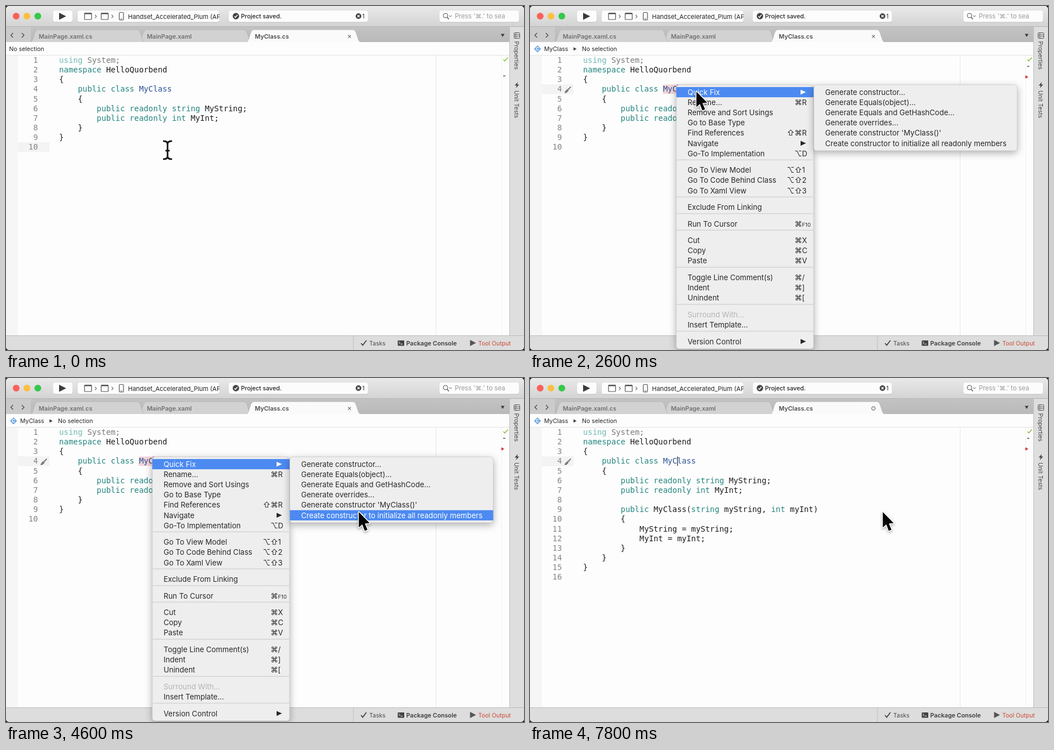
An HTML page with a canvas that plays this animation: 917 by 611 pixels, repeating every 8 s.

```html
<!DOCTYPE html>
<html lang="en">
<head>
<meta charset="utf-8">
<title>Generate constructor</title>
<style>
  html, body { margin: 0; width: 100%; height: 100%; overflow: hidden; background: #000; }
  canvas { display: block; width: 917px; height: 611px; }
</style>
</head>
<body>
<canvas id="stage" width="917" height="611"></canvas>
<script>
const W = 917, H = 611, LOOP = 8000, STEP = 200;
const screen2d = document.getElementById('stage').getContext('2d');
const layer = document.createElement('canvas');
layer.width = W;
layer.height = H;
const layer2d = layer.getContext('2d');
let ctx = screen2d; // the surface that the helpers draw on

const UI = 'Inter, "Open Sans", sans-serif';
const SYMBOL = 'Inter, "DejaVu Sans", sans-serif';
const MONO = '13.82px "DejaVu Sans Mono", monospace';

// Moments of the story, in ms
const CLICK = 1200, MENU = 1600, HOVER = 2200, SUBMENU = 2600;
const FADE = 5200, CLOSED = 5400, INSERT = 5600, BRUSH = 6800;

const PATH = [
  [200, 286, 256], [1000, 260, 148], [1800, 260, 148], [2200, 294.5, 152], [2600, 294.5, 152],
  [3000, 480, 154], [3300, 552, 182], [3600, 612, 228], [4000, 624.5, 238]
];

const HEAD = ['using System;', 'namespace HelloQuorbend', '{', '    public class MyClass', '    {',
  '        public readonly string MyString;', '        public readonly int MyInt;'];
const TAIL = ['    }', '}', ''];
const ADDED = ['', '        public MyClass(string myString, int myInt)', '        {',
  '            MyString = myString;', '            MyInt = myInt;', '        }'];

// Each group is set apart by a line; entries are label, modifiers, key
const GROUPS = [
  [['Quick Fix', '', '>'], ['Rename...', '⌘', 'R'], ['Remove and Sort Usings'], ['Go to Base Type'],
   ['Find References', '⇧⌘', 'R'], ['Navigate', '', '>'], ['Go-To Implementation', '⌥', 'D']],
  [['Go To View Model', '⌥⇧', '1'], ['Go To Code Behind Class', '⌥⇧', '2'], ['Go To Xaml View', '⌥⇧', '3']],
  [['Exclude From Linking']],
  [['Run To Cursor', '⌘', 'F10']],
  [['Cut', '⌘', 'X'], ['Copy', '⌘', 'C'], ['Paste', '⌘', 'V']],
  [['Toggle Line Comment(s)', '⌘', '/'], ['Indent', '⌘', ']'], ['Unindent', '⌘', '[']],
  [['Surround With...'], ['Insert Template...']],
  [['Version Control', '', '>']]
];
const FIXES = ['Generate constructor...', 'Generate Equals(object)...', 'Generate Equals and GetHashCode...',
  'Generate overrides...', "Generate constructor 'MyClass()'",
  'Create constructor to initialize all readonly members'];

const ROW = 18.17, MENU_TOP = 153, MENU_SIZE = 13.05;
const LINE = 17.15, COL = 8.32, CODE_X = 94;

function text(s, x, y, size, color = '#262626', weight = 400, align = 'left', family = UI) {
  ctx.font = `${weight} ${size}px ${family}`;
  ctx.fillStyle = color;
  ctx.textAlign = align;
  ctx.fillText(s, x, y);
}

function rect(x, y, w, h, color) {
  ctx.fillStyle = color;
  ctx.fillRect(x, y, w, h);
}

function box(x, y, w, h, r, fill, line, width = 1) {
  ctx.beginPath();
  ctx.roundRect(x, y, w, h, r);
  if (fill) { ctx.fillStyle = fill; ctx.fill(); }
  if (line) { ctx.strokeStyle = line; ctx.lineWidth = width; ctx.stroke(); }
}

function dot(x, y, r, fill, line) {
  box(x - r, y - r, 2 * r, 2 * r, r, fill, line);
}

function trace(points) {
  ctx.beginPath();
  points.forEach(([x, y], i) => i ? ctx.lineTo(x, y) : ctx.moveTo(x, y));
}

function poly(color, ...points) {
  trace(points);
  ctx.fillStyle = color;
  ctx.fill();
}

function stroke(color, width, ...points) {
  trace(points);
  ctx.strokeStyle = color;
  ctx.lineWidth = width;
  ctx.stroke();
}

function shade(y0, y1, top, bottom) {
  const g = ctx.createLinearGradient(0, y0, 0, y1);
  g.addColorStop(0, top);
  g.addColorStop(1, bottom);
  return g;
}

function button(x, w) {
  box(x, 8, w, 21.5, 4, '#c2c2c2');
  box(x, 7.5, w, 21, 4, '#fcfcfc', '#d6d6d6', 0.6);
}

function toolbar() {
  rect(0, 0, W, 37, shade(0, 37, '#e9e9e9', '#d3d3d3'));
  dot(18, 18, 6, '#fb615b');
  dot(37, 18, 6, '#fdbe41');
  dot(56.3, 18, 6, '#35c84b');
  button(83, 35);
  poly('#3b3b3b', [94, 12], [106.5, 18.2], [94, 24.5]);

  button(126.5, 251.5);
  for (const x of [139, 168.5]) {
    box(x, 12.5, 12.5, 11.5, 1, null, '#555', 1.2);
    rect(x, 12.5, 12.5, 2, '#555');
    stroke('#555', 1.1, [x + 18.5, 15.5], [x + 21, 18.5], [x + 18.5, 21.5]);
  }
  box(200.5, 11.5, 7.5, 13.5, 1.5, null, '#555', 1.2);
  rect(202.5, 22.5, 3.5, 1, '#555');
  ctx.save();
  ctx.beginPath();
  ctx.rect(127, 7, 251, 23);
  ctx.clip();
  text('Handset_Accelerated_Plum (API 26)', 216, 22.5, 11);
  ctx.restore();

  button(394, 247);
  dot(407, 18, 5.7, '#444');
  stroke('#fff', 1.4, [404.3, 18.2], [406.2, 20.3], [409.8, 15.8]);
  text('Project saved.', 416, 22.3, 10.6, '#222', 500);
  dot(624, 18, 5, '#444');
  stroke('#fff', 1.3, [622, 16], [626, 20]);
  stroke('#fff', 1.3, [626, 16], [622, 20]);
  text('1', 630.5, 22, 10.6, '#333');

  button(767, 141.5);
  dot(778, 17, 4, null, '#555');
  stroke('#555', 1.4, [781, 20], [784, 23.5]);
  stroke('#555', 1, [784.5, 16.8], [786.7, 19], [789, 16.8]);
  text("Press '⌘.' to sea", 794.5, 22.3, 11.3, '#9a9a9a', 400, 'left', SYMBOL);
}

function tab(x0, x1, color, label, labelX, ink) {
  ctx.beginPath();
  ctx.moveTo(x0, 64);
  ctx.bezierCurveTo(x0 + 6, 61, x0 + 5, 42, x0 + 13, 42);
  ctx.lineTo(x1 - 13, 42);
  ctx.bezierCurveTo(x1 - 5, 42, x1 - 6, 61, x1, 64);
  ctx.fillStyle = color;
  ctx.fill();
  ctx.strokeStyle = '#b0b0b0';
  ctx.lineWidth = 0.7;
  ctx.stroke();
  text(label, labelX, 57.5, 10.7, ink, 600);
}

function tabs(dirty) {
  rect(0, 36, 891, 28, shade(36, 64, '#c3c3c3', '#b9b9b9'));
  rect(0, 36, W, 1, '#b2b2b2');
  rect(0, 37, 44, 27, '#cbcbcb');
  stroke('#444', 1.2, [12.5, 48], [8.5, 52], [12.5, 56]);
  stroke('#444', 1.2, [28, 48], [32, 52], [28, 56]);
  tab(236, 434, '#d2d2d2', 'MainPage.xaml', 249.5, '#707070');
  tab(44, 245, '#d2d2d2', 'MainPage.xaml.cs', 58, '#707070');
  tab(426, 627, '#fafafa', 'MyClass.cs', 440.5, '#4a4a4a');
  if (dirty) dot(608, 54, 3.2, null, '#555');
  else {
    stroke('#777', 1.1, [605.5, 51.5], [610.5, 56.5]);
    stroke('#777', 1.1, [610.5, 51.5], [605.5, 56.5]);
  }
  poly('#3c3c3c', [876, 49.5], [882.5, 49.5], [879.2, 55]);
}

function breadcrumb(inClass) {
  rect(0, 64, 891, 24, '#fdfdfd');
  rect(0, 87, 891, 1, '#e3e3e3');
  if (inClass) {
    poly('#6fa8e3', [13.3, 70], [19.6, 76.3], [13.3, 82.6], [7, 76.3]);
    text('C', 13.3, 79.2, 8, '#fff', 700, 'center');
    text('MyClass', 25, 80.2, 10.5);
    poly('#444', [77, 73.3], [82.5, 76.3], [77, 79.3]);
  }
  text('No selection', inClass ? 92 : 5.5, 80.2, 10.5);
}

function sidePanel() {
  rect(891, 37, 26, 549, '#dedede');
  rect(891, 37, 1, 549, '#c0c0c0');
  box(899.5, 47.5, 10, 10, 1, null, '#555');
  for (const y of [50.5, 53.5]) rect(900, y, 9, 1, '#666');
  rect(902, 48, 1, 9, '#666');
  poly('#444', [906, 135], [900.5, 141.3], [904, 141.3], [902.5, 146], [908.5, 139.5], [905, 139.5]);
  for (const [label, y] of [['Properties', 62.5], ['Unit Tests', 150]]) {
    ctx.save();
    ctx.translate(899.5, y);
    ctx.rotate(Math.PI / 2);
    text(label, 0, 0, 10.4, '#484848');
    ctx.restore();
  }
}

function statusBar() {
  rect(0, 585, W, 26, '#dddddd');
  rect(0, 585, W, 1, '#bcbcbc');
  rect(614.5, 586, 1, 25, '#bdbdbd');
  stroke('#444', 1.8, [628.5, 599], [631.5, 602.5], [638, 594]);
  text('Tasks', 643, 602.5, 10.5, '#4a4a4a');
  box(693.5, 594, 11.5, 9.5, 1, '#444');
  stroke('#fff', 1, [695.5, 596.2], [697.7, 598.2], [695.5, 600.2]);
  rect(698.5, 600, 3.5, 1, '#fff');
  text('Package Console', 708.5, 602.5, 10.7, '#3c3c3c', 600);
  poly('#555', [821.5, 593], [832, 598.5], [821.5, 604]);
  text('Tool Output', 836, 602.5, 10.5, '#cc4a33');
}

function codeLine(line, i) {
  const y = 101 + i * LINE;
  const color = word => {
    if (i === 0) return word === 'using' ? '#73b9b5' : '#7b7b7b';
    if (/^(namespace|public|class|readonly|string|int)$/.test(word)) return '#24857f';
    return i === 3 && word === 'MyClass' ? '#2b5296' : '#1c1c1c';
  };
  ctx.textAlign = 'left';
  ctx.font = MONO;
  for (const m of line.matchAll(/\w+|[^\w\s]+/g)) {
    ctx.fillStyle = color(m[0]);
    ctx.fillText(m[0], CODE_X + m.index * COL, y);
  }
  ctx.fillStyle = '#858585';
  ctx.textAlign = 'right';
  ctx.fillText(i + 1, 56.5, y);
}

function brush() {
  stroke('#555', 1.6, [72.3, 143.5], [67.8, 148]);
  stroke('#555', 1, [66.3, 146.8], [69.2, 149.7]);
  poly('#555', [65.8, 148], [68.2, 150.4], [64.6, 154], [61, 154.6], [62.6, 151.2]);
  stroke('#fff', 0.8, [63.2, 153], [66, 150.2]);
}

function editor(t) {
  const inClass = t >= CLICK;
  rect(0, 88, 891, 497, '#fdfdfd');
  rect(0, 88, 21, 497, '#f6f6f6');
  rect(21, inClass ? 139 : 242, 56, 17.5, '#f3f3f3');
  rect(761, 88, 1, 497, '#e6e6e6');
  for (let y = 88; y < 585; y += 3) rect(877, y, 1, 1, '#dadada');

  if (inClass && t < CLOSED) rect(235, 139.5, 59.5, 16.5, '#f3d3d7');
  const lines = [...HEAD, ...(t >= INSERT ? ADDED : []), ...TAIL];
  lines.forEach(codeLine);

  const caretOn = t < INSERT || t % 1000 >= 500;
  if (inClass && caretOn) rect(260.5, 139.5, 1.2, 16.5, '#222');
  if (inClass && (t < INSERT || t >= BRUSH)) brush();

  stroke('#8fc04a', 1.6, [880.5, 95], [883, 97.5], [888.5, 91.5]);
  const marked = t >= SUBMENU;
  rect(880, marked ? 106.5 : 123.5, 4, 1.3, '#444');
  if (marked) poly('#d8302f', [877, 123], [882, 126], [877, 129]);
}

function panel(x, y, w, h) {
  ctx.save();
  ctx.shadowColor = 'rgba(0,0,0,.32)';
  ctx.shadowBlur = 14;
  ctx.shadowOffsetY = 4;
  box(x, y, w, h, 5, '#eeeeee');
  ctx.restore();
  box(x, y, w, h, 5, null, '#c4c4c4', 0.7);
}

function highlight(x, w, y) {
  rect(x, y - ROW / 2, w, ROW, '#4c8af1');
}

function shortcut(mods, key, y, ink) {
  if (key === '>') return poly(ink, [479, y - 4.3], [488.5, y], [479, y + 4.3]);
  [...mods].reverse().forEach((mod, i) =>
    text(mod, 475 - i * 13.5, y + 4.7, MENU_SIZE, ink, 400, 'center', SYMBOL));
  text(key, 481.5, y + 4.7, key.length > 1 ? 9.5 : MENU_SIZE, ink);
}

function menu(hover) {
  panel(259, 140, 243, 469);
  let y = MENU_TOP;
  GROUPS.forEach((group, g) => {
    if (g) {
      rect(259.5, y - 3.8 - ROW / 2 - 1.8 + 7, 242, 1.6, '#d6d6d6');
      y += 11.35;
    }
    for (const [label, mods, key] of group) {
      const lit = hover && label === 'Quick Fix';
      const ink = lit ? '#fff' : label === 'Surround With...' ? '#b4b4b4' : '#282828';
      if (lit) highlight(259, 243, y);
      text(label, 279, y + 4.7, MENU_SIZE, ink);
      if (key) shortcut(mods, key, y, ink);
      y += ROW;
    }
  });
}

function submenu(p) {
  panel(502.5, 140, 360, 117);
  const active = p.x > 502 ? Math.floor((p.y - MENU_TOP + ROW / 2) / ROW) : -1;
  FIXES.forEach((label, i) => {
    const y = MENU_TOP + i * ROW;
    if (i === active) highlight(502.5, 360, y);
    text(label, 522.5, y + 4.7, MENU_SIZE, i === active ? '#fff' : '#282828');
  });
}

// The menus fade as one picture, so they are drawn apart first
function menus(t, p) {
  ctx = layer2d;
  ctx.clearRect(0, 0, W, H);
  menu(t >= HOVER);
  if (t >= SUBMENU) submenu(p);
  ctx = screen2d;
  ctx.globalAlpha = t >= FADE ? 0.37 : 1;
  ctx.drawImage(layer, 0, 0);
  ctx.globalAlpha = 1;
}

function pointer(t) {
  let i = PATH.findIndex(k => k[0] > t);
  if (i < 0) i = PATH.length;
  const a = PATH[Math.max(i - 1, 0)], b = PATH[Math.min(i, PATH.length - 1)];
  const k = a === b ? 0 : (t - a[0]) / (b[0] - a[0]);
  return { x: a[1] + (b[1] - a[1]) * k, y: a[2] + (b[2] - a[2]) * k };
}

function arrow({ x, y }) {
  ctx.save();
  ctx.translate(x, y);
  trace([[0, 0], [0, 27.5], [6.2, 22], [10.6, 33.5], [15.4, 31.5], [10.8, 20.5], [19.2, 19.8]]);
  ctx.closePath();
  ctx.shadowColor = 'rgba(0,0,0,.35)';
  ctx.shadowBlur = 4;
  ctx.shadowOffsetY = 2;
  ctx.strokeStyle = '#fff';
  ctx.lineWidth = 3;
  ctx.lineJoin = 'round';
  ctx.stroke();
  ctx.shadowColor = 'transparent';
  ctx.fillStyle = '#050505';
  ctx.fill();
  ctx.restore();
}

function beam({ x, y }) {
  ctx.save();
  ctx.translate(x, y);
  ctx.lineCap = 'round';
  for (const [color, width] of [['#fff', 5], ['#111', 2.8]]) {
    ctx.strokeStyle = color;
    ctx.lineWidth = width;
    ctx.beginPath();
    ctx.moveTo(0, -11);
    ctx.lineTo(0, 11);
    for (const sx of [-1, 1]) for (const sy of [-1, 1]) {
      ctx.moveTo(sx * 6.8, sy * 16);
      ctx.quadraticCurveTo(0, sy * 16, 0, sy * 10.5);
    }
    ctx.moveTo(-2.5, 1);
    ctx.lineTo(2.5, 1);
    ctx.stroke();
  }
  ctx.restore();
}

function draw(t) {
  const p = pointer(t);
  rect(0, 0, W, H, '#000');
  ctx.save();
  ctx.beginPath();
  ctx.roundRect(0, 0, W, H, 5);
  ctx.clip();
  toolbar();
  tabs(t >= INSERT);
  breadcrumb(t >= CLICK);
  editor(t);
  sidePanel();
  statusBar();
  if (t >= MENU && t < CLOSED) menus(t, p);
  (t >= MENU ? arrow : beam)(p);
  ctx.restore();
}

const start = performance.now();
function tick() {
  const t = (performance.now() - start) % LOOP;
  draw(Math.floor(t / STEP) * STEP);
  requestAnimationFrame(tick);
}
tick();
</script>
</body>
</html>
```
